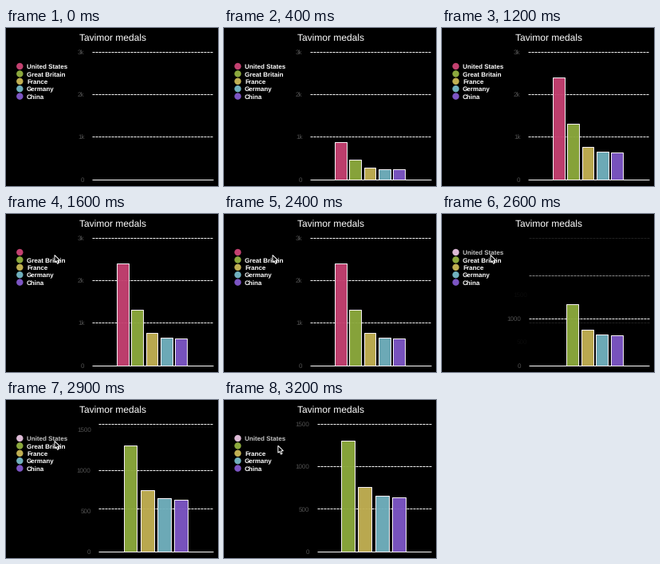
Animation, 266 px wide and 198 px high, one loop 3.3 s. Source, as a matplotlib script:

```python
import math

import matplotlib.pyplot as plt
from matplotlib.animation import FuncAnimation
from matplotlib.patches import Circle, Polygon, Rectangle

W, H, DPI = 266, 198, 64
PX = 72 / DPI
STEP, FRAMES = 100, 33
TOP, BASE, RIGHT = 29.6, 189.6, 260
LEFT_WIDE, LEFT_NARROW = 108, 116.8
GROW, CLICK = -10, 2495

SERIES = [
    ("United States", 2400, "#c34170"),
    ("Great Britain", 1304, "#8ba83d"),
    ("France", 752, "#c0af52"),
    ("Germany", 650, "#70b0bd"),
    ("China", 630, "#7c55c3"),
]
ARROW = [(0, 0), (0, 9), (2, 7.2), (3.6, 10.8), (5.2, 10.1), (3.7, 6.7), (6.6, 6.5)]

plt.rcParams["font.family"] = "Liberation Sans"
plt.rcParams["text.hinting"] = "no_hinting"
fig = plt.figure(figsize=(W / DPI, H / DPI), dpi=DPI, facecolor="black")
ax = fig.add_axes([0, 0, 1, 1])


def lerp(a, b, p):
    return a + (b - a) * p


def sine(t, start, duration):
    x = min(max((t - start) / duration, 0), 1)
    return 0.5 - math.cos(math.pi * x) / 2


def text(x, y, label, size=8, color="white", **style):
    ax.text(x, y, label, fontsize=size * PX, color=color, va="baseline", **style)


def grid(y, left, alpha=1.0, dashed=True):
    style = (0, (3, 1)) if dashed else "-"
    ax.plot([left, RIGHT], [y, y], color="white", lw=PX, ls=style,
            alpha=alpha, zorder=1, solid_capstyle="butt", dash_capstyle="butt")


def tick(x, y, label, alpha=1.0):
    text(x, y + 3.2, label, color="#525252", ha="right", alpha=alpha)


def bar_slot(index, count, left):
    """Left edge and width of a bar: 20% group padding, 10% bar padding."""
    span = RIGHT - left
    pitch = 0.6 * span / count
    return left + 0.2 * span + (index + 0.1) * pitch - 1, 0.8 * pitch


def cursor_at(t):
    if t < 1300:
        return None
    if t <= 3000:
        p = 1 - (1 - min((t - 1200) / 400, 1)) ** 2
        return lerp(130, 61, p), lerp(100, 51.5, p)
    p = (t - 3000) / 200
    return lerp(61, 67.8, p), lerp(51.5, 57.2, p)


def draw_axis(p, clicked):
    left = lerp(LEFT_WIDE, LEFT_NARROW, p)
    label_x = lerp(98.5, 107, p)
    unit = (BASE - TOP) * lerp(1 / 3000, 1 / 1500, p)

    def y_of(value):
        return BASE - value * unit

    grid(BASE, left, dashed=False)
    tick(label_x, BASE, "0")
    if not clicked:
        for value in (1000, 2000, 3000):
            grid(y_of(value), left)
            tick(label_x, y_of(value), f"{value // 1000}k")
        return y_of

    grid(y_of(1000), left)
    tick(label_x, y_of(1000), "1000")
    fade = min(1, 1.25 * p)
    for value in (500, 1500):
        grid(BASE - (BASE - TOP) * value / 1500, left, fade)
        tick(107, y_of(value), str(value), fade)
    if p < 1:
        grid(lerp(83, TOP, p), left, 0.6 * (1 - p))
    return y_of


def draw_bars(t, p, clicked, y_of):
    grown = sine(t, GROW, 1000)
    for i, (_, value, color) in enumerate(SERIES):
        if clicked and i == 0:
            continue
        before = bar_slot(i, 5, LEFT_WIDE)
        after = bar_slot(i - 1, 4, LEFT_NARROW)
        left, width = (lerp(a, b, p) for a, b in zip(before, after))
        top = y_of(value * grown)
        if BASE - top > 1:
            ax.add_patch(Rectangle((left, top), width, BASE - top,
                                   facecolor=(color, 0.97), edgecolor="#f4eef2",
                                   lw=PX, zorder=2))


def draw_legend(clicked, hovered):
    for i, (name, _, color) in enumerate(SERIES):
        y = 48 + 9.4 * i
        off = clicked and i == 0
        ax.add_patch(Circle((17.3, y), 4.2, lw=0, color="#dcbad5" if off else color))
        if i != hovered:
            text(26, y + 3.2, name, color="#c4c4c4" if off else "white",
                 weight="bold")


def draw(frame):
    t = frame * STEP
    clicked = t >= CLICK
    p = sine(t, CLICK, 500)

    ax.clear()
    ax.set(xlim=(0, W), ylim=(H, 0))
    ax.axis("off")

    text(133.5, 15.6, "Tavimor medals", size=12, ha="center")
    y_of = draw_axis(p, clicked)
    draw_bars(t, p, clicked, y_of)

    cursor = cursor_at(t)
    hovered = None
    if cursor:
        if cursor[1] > 53 and clicked:
            hovered = 1
        elif cursor[1] < 53 and not clicked:
            hovered = 0
    draw_legend(clicked, hovered)

    if cursor:
        x, y = cursor
        ax.add_patch(Polygon([(x + dx, y + dy) for dx, dy in ARROW],
                             facecolor="black", edgecolor="white",
                             lw=PX, zorder=6))
    return []


anim = FuncAnimation(fig, draw, frames=FRAMES, interval=STEP,
                     init_func=lambda: [], repeat=True, repeat_delay=0)
plt.show()
```
